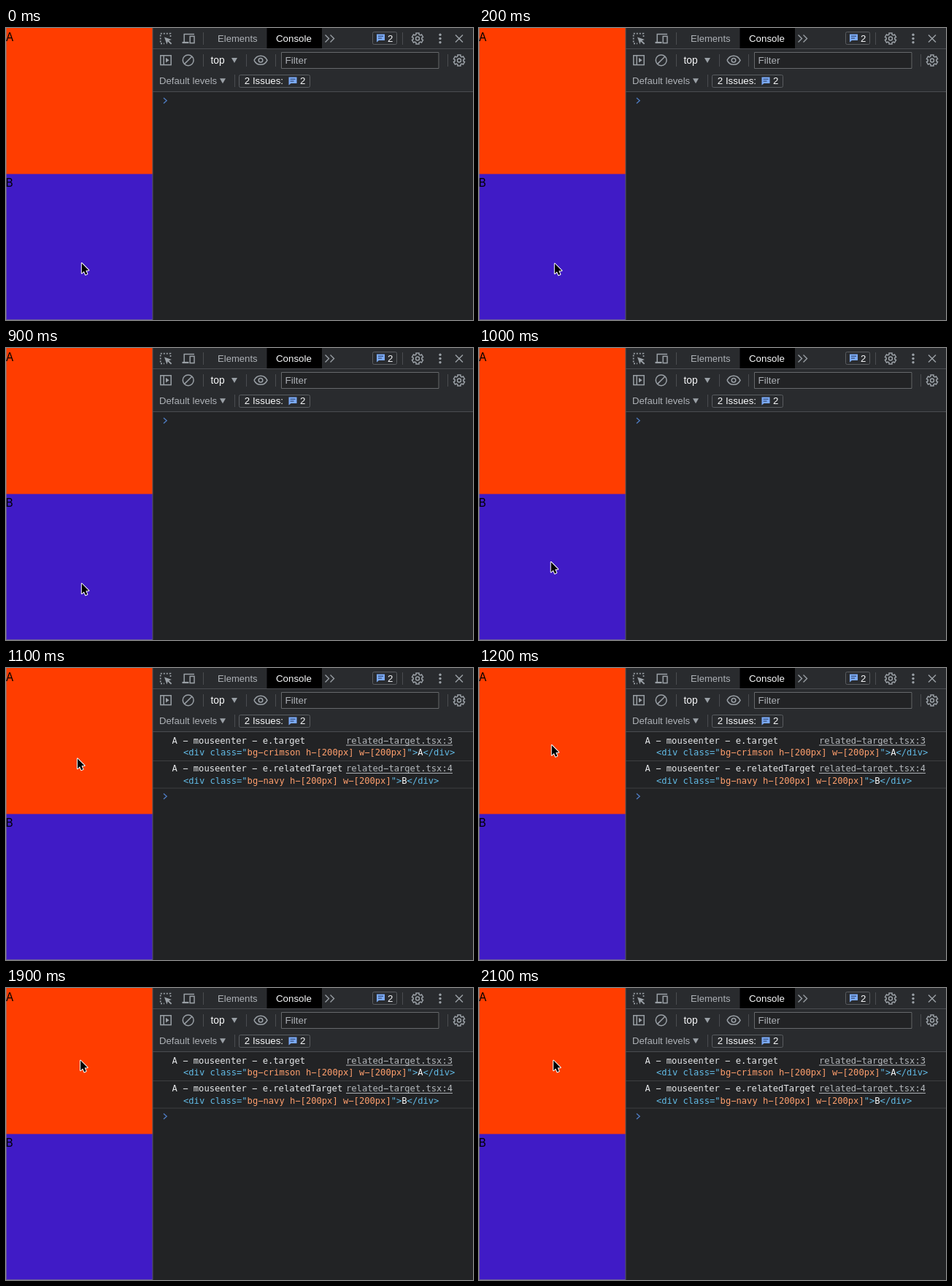
An HTML page with a canvas that plays this animation: 640 px wide and 401 px high, repeating every 2620 ms.

```html
<!DOCTYPE html>
<html lang="en">
<head>
<meta charset="utf-8">
<title>Console demo</title>
<style>
html, body { margin: 0; width: 100%; height: 100%; overflow: hidden; background: #202124; }
canvas { display: block; width: 640px; height: 401px; }
</style>
</head>
<body>
<canvas id="stage"></canvas>
<script>
const W = 640, H = 401, LOOP = 2620;
const canvas = document.getElementById('stage');
const scale = window.devicePixelRatio || 1;
canvas.width = Math.round(W * scale);
canvas.height = Math.round(H * scale);
const ctx = canvas.getContext('2d');

const SANS = '"Liberation Sans", Arial, sans-serif';
const MONO = '"DejaVu Sans Mono", monospace';
const PAGE = 'Inter, sans-serif';
const GRAY = '#9aa0a6', LABEL = '#adb1b6', WHITE = '#f8f9fa', BLUE = '#62bbe6', ORANGE = '#ff9f6d';
const BAR = '#292b2e', BODY = '#222325', RULE = '#4a4c50', EDGE = 'rgba(130,130,130,.6)';

// [start time, tip x, tip y]: the pointer jumps at each start time
const PATH = [
  [0, 103.8, 323], [200, 103.8, 323.6], [1000, 98.7, 294], [1100, 98, 124.4],
  [1200, 99.7, 106], [1300, 101.5, 101], [1400, 102.1, 99.6]
];
const LOG_TIME = 1100;

function rect(x, y, w, h, color) {
  ctx.fillStyle = color;
  ctx.fillRect(x, y, w, h);
}

function frame(x, y, w, h, color, radius = 0) {
  ctx.strokeStyle = color;
  ctx.lineWidth = 1;
  ctx.beginPath();
  ctx.roundRect(x + 0.5, y + 0.5, w - 1, h - 1, radius);
  ctx.stroke();
}

function text(str, x, y, color, size = 13.3, family = SANS) {
  ctx.font = `${size}px ${family}`;
  ctx.fillStyle = color;
  ctx.fillText(str, x, y);
  return x + ctx.measureText(str).width;
}

// The minus sign gives the console font its wide hyphen.
const mono = (str, x, y, color) => text(str.replaceAll('-', '\u2212'), x, y, color, 12.13, MONO);

function line(points, color = GRAY, width = 1.5, closed = false) {
  ctx.strokeStyle = color;
  ctx.lineWidth = width;
  trace(points, closed);
  ctx.stroke();
}

function shape(points, color) {
  ctx.fillStyle = color;
  trace(points, true);
  ctx.fill();
}

function trace(points, closed) {
  ctx.beginPath();
  points.forEach(([x, y]) => ctx.lineTo(x, y));
  if (closed) ctx.closePath();
}

function ring(x, y, r, width = 1.5) {
  ctx.strokeStyle = GRAY;
  ctx.lineWidth = width;
  ctx.beginPath();
  ctx.arc(x, y, r, 0, Math.PI * 2);
  ctx.stroke();
}

function dot(x, y, r) {
  ctx.fillStyle = GRAY;
  ctx.beginPath();
  ctx.arc(x, y, r, 0, Math.PI * 2);
  ctx.fill();
}

function gear(x, y) {
  const points = [];
  for (let i = 0; i < 6; i++) {
    for (const [offset, r] of [[-0.36, 5.9], [-0.26, 7.8], [0.26, 7.8], [0.36, 5.9]]) {
      const a = i * Math.PI / 3 + Math.PI / 2 + offset;
      points.push([x + r * Math.cos(a), y + r * Math.sin(a)]);
    }
  }
  line(points, GRAY, 1.5, true);
  ring(x, y, 2.5);
}

function caret(x, y, color) {
  shape([[x, y], [x + 8, y], [x + 4, y + 7]], color);
}

function bubble(x, y) {
  shape([[x, y], [x + 11, y], [x + 11, y + 8.5], [x + 3, y + 8.5], [x, y + 11]], '#7baaf7');
  rect(x + 2, y + 2.2, 7, 1.1, '#30466b');
  rect(x + 2, y + 5, 5, 1.1, '#30466b');
}

function inspectIcon() {
  ctx.setLineDash([2, 2]);
  line([[225.5, 12], [225.5, 7.7], [211.7, 7.7], [211.7, 21.3], [217, 21.3]], GRAY, 1.7);
  ctx.setLineDash([]);
  shape([[217, 12.5], [227, 16], [223.2, 17.3], [227.3, 21.2], [225.9, 22.6],
    [221.8, 18.6], [220.4, 22.4]], GRAY);
}

function deviceIcon() {
  line([[258, 8.4], [244.2, 8.4], [244.2, 19.2]], GRAY, 1.5);
  line([[241.5, 20], [250.5, 20]], GRAY, 2.2);
  ctx.strokeStyle = GRAY;
  ctx.lineWidth = 1.5;
  ctx.strokeRect(252.2, 11.4, 5.8, 9.2);
}

function sidebarIcon() {
  ctx.strokeStyle = GRAY;
  ctx.lineWidth = 1.5;
  ctx.strokeRect(211.8, 37.8, 14.4, 12.8);
  line([[216.2, 38], [216.2, 50.5]]);
  shape([[219, 40.8], [223.6, 44.2], [219, 47.6]], GRAY);
}

function eyeIcon(x, y) {
  ctx.strokeStyle = GRAY;
  ctx.lineWidth = 1.5;
  ctx.beginPath();
  ctx.moveTo(x - 9, y);
  ctx.bezierCurveTo(x - 5, y - 8, x + 5, y - 8, x + 9, y);
  ctx.bezierCurveTo(x + 5, y + 8, x - 5, y + 8, x - 9, y);
  ctx.stroke();
  ring(x, y, 2.8);
}

function drawPage() {
  rect(0, 0, 201, 201, '#ff3d00');
  rect(0, 200.5, 201, 200.5, '#401bc6');
  rect(0, 0, 1, H, EDGE);
  rect(1, H - 1, 200, 1, EDGE);
  text('A', -0.2, 17.7, '#000', 15.6, PAGE);
  text('B', -0.6, 218, '#000', 15.6, PAGE);
}

function drawTabs() {
  rect(357.5, 0, 75.5, 28, '#000');
  rect(201, 28, 439, 1, RULE);
  inspectIcon();
  deviceIcon();
  rect(270, 6, 1, 17, RULE);
  text('Elements', 290, 19, LABEL, 13.1);
  text('Console', 370, 19, WHITE);
  for (const x of [437.5, 444.5]) line([[x, 9.5], [x + 5, 14.5], [x, 19.5]], GRAY, 1.4);
  frame(502, 5, 34, 18, '#5a5d61', 2);
  bubble(508, 8.5);
  text('2', 523, 18.5, WHITE);
  rect(543, 6, 1, 17, RULE);
  gear(564, 14.5);
  for (const y of [9.3, 14.5, 19.7]) dot(595, y, 1.7);
  line([[616, 9.5], [626, 19.5]]);
  line([[626, 9.5], [616, 19.5]]);
}

function drawToolbar() {
  sidebarIcon();
  ring(249.7, 44.3, 7.4);
  line([[244.6, 49.4], [254.8, 39.2]]);
  for (const x of [270, 329, 369, 605]) rect(x, 36, 1, 17, RULE);
  text('top', 280.4, 49, WHITE, 13.8);
  caret(309, 41, GRAY);
  eyeIcon(349, 44.3);
  rect(377, 33, 216.5, 23, BODY);
  frame(377, 33, 216.5, 23, '#66686b');
  text('Filter', 382.5, 49, LABEL, 13.5);
  gear(621, 44.5);

  text('Default levels', 210, 77.3, LABEL, 13.2);
  caret(293, 69.3, GRAY);
  rect(313, 64, 1, 17, RULE);
  frame(319, 64, 98, 18, '#5a5d61', 2);
  text('2 Issues:', 326.8, 77.3, WHITE, 13.3);
  bubble(387.5, 67.5);
  text('2', 403, 77.3, WHITE);
}

function drawEntry(y, label, lineNo, color, letter) {
  mono(`A - mouseenter - ${label}`, 227.6, y, '#e6e8ea');
  const end = mono(`related-target.tsx:${lineNo}`, 466, y, '#b4b8bc');
  rect(466, y + 1.5, end - 466, 1, '#b4b8bc');

  const parts = [
    ['<div class="', BLUE], [`bg-${color} h-[200px] w-[200px]`, ORANGE],
    ['">', BLUE], [letter, WHITE], ['</div>', BLUE]
  ];
  let x = 243;
  for (const [str, tint] of parts) x = mono(str, x, y + 16.4, tint);
}

function drawConsole(logged) {
  if (logged) {
    drawEntry(104, 'e.target', 3, 'crimson', 'A');
    rect(201, 127, 439, 1, '#3d3e41');
    drawEntry(142.4, 'e.relatedTarget', 4, 'navy', 'B');
    rect(201, 164.5, 439, 1, '#3d3e41');
  }
  const y = logged ? 176.3 : 99.8;
  line([[216, y - 3.8], [220.2, y], [216, y + 3.8]], '#4f7dc4', 1.3);
}

function drawPointer(x, y) {
  const size = 0.87;
  const points = [[0, 0], [0, 15.8], [3.6, 12.5], [6, 18.1], [8.7, 16.9], [6.3, 11.4], [11, 11.1]]
    .map(([dx, dy]) => [x + dx * size, y + dy * size]);
  ctx.lineJoin = 'round';
  line(points, '#fff', 2, true);
  ctx.lineJoin = 'miter';
  shape(points, '#000');
}

function draw(t) {
  ctx.setTransform(scale, 0, 0, scale, 0, 0);
  drawPage();
  rect(201, 0, 439, 88, BAR);
  rect(201, 88, 439, 313, BODY);
  rect(201, 87, 439, 1, RULE);
  drawTabs();
  drawToolbar();
  drawConsole(t >= LOG_TIME);
  rect(200.5, 0, 1, H, '#55575a');
  const [, x, y] = PATH.findLast(([start]) => t >= start);
  drawPointer(x, y);
}

const startTime = performance.now();
function tick() {
  draw((performance.now() - startTime) % LOOP);
  requestAnimationFrame(tick);
}
tick();
</script>
</body>
</html>
```
